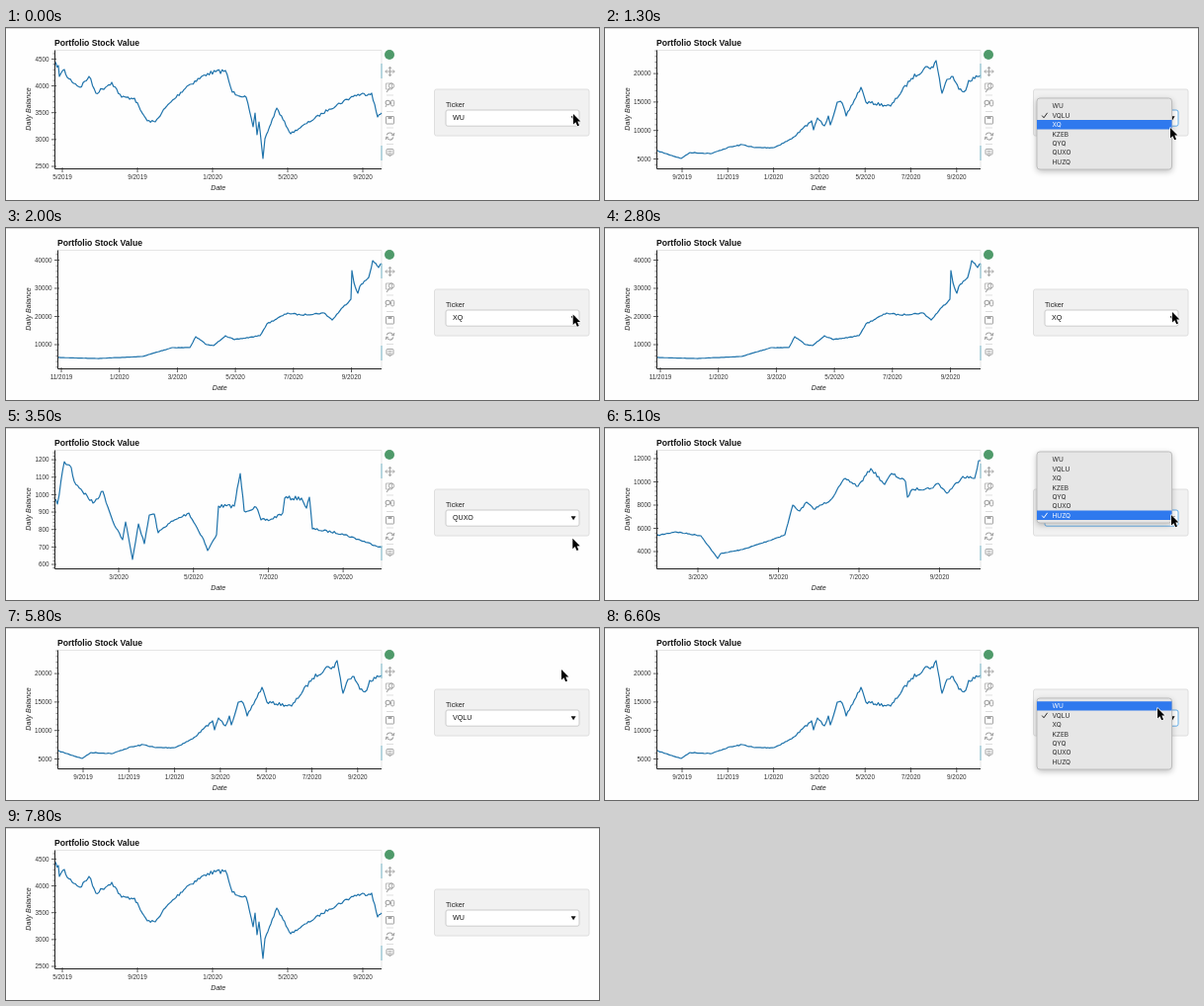
An HTML page with a canvas for the animation above (7900 ms loop, 600 by 174 pixels).

```html
<!DOCTYPE html>
<html lang="en">
<head>
<meta charset="utf-8">
<title>Portfolio Stock Value</title>
<style>
html, body { margin: 0; width: 600px; height: 174px; overflow: hidden; background: #fefefe; }
canvas { display: block; width: 600px; height: 174px; }
</style>
</head>
<body>
<canvas id="stage"></canvas>
<script>
const canvas = document.getElementById('stage');
const ctx = canvas.getContext('2d');
const dpr = window.devicePixelRatio || 1;
canvas.width = 600 * dpr;
canvas.height = 174 * dpr;

const LOOP = 7900, TOP = 22.5, BOTTOM = 142.5, RIGHT = 380;
const SANS = '"Liberation Sans", Arial, sans-serif';
const UI = 'Inter, "Liberation Sans", sans-serif';
const TICKERS = ['WU', 'VQLU', 'XQ', 'KZEB', 'QYQ', 'QUXO', 'HUZQ'];

// Fills the gaps between key points with a small daily wobble, larger for higher values.
function daily(keys, amp) {
  let seed = 7;
  const rand = () => (seed = seed * 16807 % 2147483647) / 2147483647 - 0.5;
  const out = [];
  for (let i = 0; i < keys.length; i += 2) {
    const [x, y, nx, ny] = keys.slice(i, i + 4);
    out.push(x, y);
    if (nx === undefined) break;
    const n = Math.round((nx - x) / 1.6);
    for (let k = 1; k < n; k++) {
      const base = y + (ny - y) * k / n;
      out.push(x + (nx - x) * k / n, base + rand() * amp * (142 - base) / 70);
    }
  }
  return out;
}

// yAxis: [first value, pixel, value step, pixel step, count]
// xAxis: [first month, year, month step, pixel, pixel step, count]
function chart(left, yAxis, xAxis, amp, keys) {
  return { left, yAxis, xAxis, points: daily(keys, amp) };
}

const charts = [];
charts[0] = chart(49, [2500, 140, 500, 27.15, 5], [5, 2019, 4, 57, 76, 5], 3.2, [
  49, 37, 53, 38, 54, 49, 59, 42, 62, 50, 75, 60, 84, 49, 91, 66, 107, 55, 117, 70,
  130, 71, 136, 83, 143, 94, 151, 95, 161, 81, 183, 59, 204, 46, 222, 43, 229, 65, 243, 70,
  250, 100, 252, 86, 254, 108, 256, 95, 260, 132, 262, 112, 274, 81, 288, 107, 327, 82,
  353, 68, 370, 66, 376, 90, 380, 86]);
charts[1] = chart(52, [5000, 132.5, 5000, 28.8, 4], [9, 2019, 2, 78, 46.3, 7], 3.2, [
  52, 124, 77, 132, 86, 126, 108, 127, 124, 121, 139, 118, 151, 121, 171, 121, 189, 112,
  209, 94, 211, 103, 215, 91, 222, 99, 226, 89, 228, 98, 235, 75, 240, 76, 244, 89,
  259, 60, 264, 75, 289, 79, 310, 51, 326, 39, 332, 40, 335, 33, 337, 44, 341, 66,
  346, 52, 352, 49, 358, 62, 365, 63, 368, 53, 380, 48]);
charts[2] = chart(52, [10000, 118, 10000, 28.5, 4], [11, 2019, 2, 56, 58.7, 6], 1.8, [
  52, 131, 92, 132, 138, 130, 168, 121, 186, 121, 192, 110, 203, 118, 210, 119, 222, 109,
  231, 113, 257, 109, 264, 97, 285, 86, 298, 88, 322, 86, 330, 93, 341, 80, 349, 72,
  350, 43, 352, 55, 356, 66, 358, 59, 367, 50, 371, 33, 377, 40, 380, 36]);
charts[5] = chart(49, [600, 138, 100, 17.65, 7], [3, 2020, 2, 114, 75.7, 4], 4, [
  49, 72, 52, 77, 59, 34, 66, 40, 69, 54, 76, 62, 88, 76, 98, 64, 108, 94, 118, 113,
  121, 95, 128, 133, 134, 97, 140, 117, 145, 88, 150, 87, 154, 106, 164, 97, 185, 86,
  200, 113, 204, 124, 213, 108, 215, 79, 231, 79, 237, 46, 241, 84, 253, 80, 258, 93,
  267, 93, 280, 86, 282, 71, 299, 71, 304, 81, 307, 70, 310, 102, 340, 107, 380, 121]);
charts[6] = chart(52, [4000, 125, 2000, 23.5, 5], [3, 2020, 2, 94, 81.5, 4], 2.2, [
  52, 109, 71, 105, 97, 109, 114, 132, 117, 127, 139, 123, 166, 114, 182, 108, 190, 78,
  197, 84, 204, 75, 211, 82, 228, 73, 243, 51, 256, 59, 269, 41, 283, 57, 290, 46,
  304, 54, 306, 70, 311, 62, 330, 61, 337, 56, 346, 66, 362, 49, 374, 51, 378, 33, 380, 33]);

// [start, selected ticker]
const picks = [[0, 0], [700, 1], [1700, 2], [3400, 5], [4900, 6], [5800, 1], [6800, 0]];
// [open, close]
const menus = [[200, 700], [1000, 1700], [2900, 3400], [4400, 4900], [5000, 5800], [6200, 6800]];
// [time, x, y]
const path = [[0, 574, 87], [300, 574, 88], [500, 574, 98], [700, 574, 98], [900, 574, 90],
  [1000, 574, 90], [1200, 572, 101], [1700, 572, 101], [2100, 574, 85], [2900, 574, 85],
  [3300, 573, 116], [3400, 573, 116], [3800, 575, 89], [4400, 575, 89], [4600, 575, 98],
  [4900, 573, 97], [5000, 573, 88], [5200, 573, 88], [5600, 562, 42], [5800, 562, 42],
  [6100, 572, 88], [6300, 572, 88], [6500, 559, 81], [7000, 559, 81]];
const CURSOR_END = 7000;

function text(str, x, y, font, color = '#222', align = 'left') {
  ctx.font = font;
  ctx.fillStyle = color;
  ctx.textAlign = align;
  ctx.fillText(str, x, y);
}

function stroke(color, width, ...pts) {
  ctx.beginPath();
  for (let i = 0; i < pts.length; i += 2) ctx.lineTo(pts[i], pts[i + 1]);
  ctx.strokeStyle = color;
  ctx.lineWidth = width;
  ctx.stroke();
}

function box(x, y, w, h, r, fill, line) {
  ctx.beginPath();
  ctx.roundRect(x, y, w, h, r);
  if (fill) { ctx.fillStyle = fill; ctx.fill(); }
  if (line) { ctx.strokeStyle = line; ctx.lineWidth = 1; ctx.stroke(); }
}

function ring(x, y, r, from = 0, to = Math.PI * 2) {
  ctx.beginPath();
  ctx.arc(x, y, r, from, to);
  ctx.stroke();
}

function drawChart(c) {
  const left = c.left + 0.5, mid = (left + RIGHT) / 2;
  stroke('#e5e5e5', 1, left, TOP, RIGHT, TOP, RIGHT, BOTTOM);
  text('Portfolio Stock Value', c.left, 18, 'bold 8.6px ' + SANS, '#111');

  ctx.lineJoin = 'round';
  stroke('#1f73ab', 1.2, ...c.points);
  stroke('#222', 1, left, TOP, left, BOTTOM, RIGHT, BOTTOM);

  const [v0, y0, dv, dy, ny] = c.yAxis;
  for (let k = -5; k < ny * 5 + 5; k++) {
    const y = y0 - k * dy / 5;
    if (y < TOP || y > BOTTOM) continue;
    const major = k % 5 === 0;
    stroke('#333', major ? 0.8 : 0.6, left - (major ? 3.5 : 2), y, left + (major ? 1.5 : 0), y);
    if (major) text(v0 + dv * k / 5, left - 6, y + 2.3, '6.3px ' + SANS, '#333', 'right');
  }

  const [m0, year, dm, x0, dx, nx] = c.xAxis;
  for (let k = 0; k < nx; k++) {
    const m = m0 - 1 + dm * k, x = x0 + dx * k;
    stroke('#333', 0.8, x, BOTTOM - 1.5, x, BOTTOM + 3.5);
    text((m % 12 + 1) + '/' + (year + Math.floor(m / 12)), x, 153.2, '6.4px ' + SANS, '#333', 'center');
  }

  text('Date', mid, 163.5, 'italic 7.1px ' + SANS, '#222', 'center');
  ctx.save();
  ctx.translate(25, 82);
  ctx.rotate(-Math.PI / 2);
  text('Daily Balance', 0, 0, 'italic 7.1px ' + SANS, '#222', 'center');
  ctx.restore();
}

function drawTools() {
  const gray = '#a3a3a3', x = 388.5;
  ctx.fillStyle = '#4f9a6a';
  ctx.beginPath();
  ctx.arc(388, 27, 5, 0, Math.PI * 2);
  ctx.fill();

  stroke('#8fc3d3', 1.2, RIGHT, 36, RIGHT, 51);
  stroke('#8fc3d3', 1.2, RIGHT, 119, RIGHT, 134);
  for (let y = 68; y < 120; y += 16.5) stroke('#d0d0d0', 0.7, 385, y, 392, y);

  // pan
  for (let i = 0; i < 4; i++) {
    ctx.save();
    ctx.translate(x, 44);
    ctx.rotate(i * Math.PI / 2);
    stroke(gray, 1, 0, 0, 4.5, 0);
    stroke(gray, 0.9, 3, -1.6, 4.8, 0, 3, 1.6);
    ctx.restore();
  }
  // box zoom
  box(384.5, 56, 6, 6, 0, null, '#bbb');
  ctx.strokeStyle = gray;
  ring(390, 58.5, 2.6);
  stroke(gray, 1.1, 388, 61, 385, 65);
  // wheel zoom
  ring(386.3, 75.5, 2.2);
  stroke(gray, 1, 385, 78, 384, 80);
  box(389.5, 73, 3.2, 6, 1.6, null, gray);
  // save
  box(384.5, 89.5, 8, 7.5, 0.5, null, gray);
  box(386.5, 89.5, 4, 2.5, 0, gray);
  // reset
  ctx.lineWidth = 1.1;
  ring(x, 109.5, 3.5, 0.3, 2.8);
  ring(x, 109.5, 3.5, 3.5, 5.9);
  stroke(gray, 1, 392.8, 106, 392.3, 109, 389.8, 108);
  stroke(gray, 1, 384.3, 113, 384.8, 110, 387.2, 111);
  // hover
  box(385, 122.5, 7, 5.5, 0.8, null, gray);
  stroke(gray, 0.8, 386.5, 124.5, 390.5, 124.5);
  stroke(gray, 0.8, 386.5, 126.2, 390.5, 126.2);
  stroke(gray, 1, 387, 128, x, 130, 390, 128);
}

function drawPanel(pick, open) {
  box(433.5, 62, 156.5, 47, 2, '#f1f1f1', '#dedede');
  text('Ticker', 445, 80, '7.1px ' + SANS);
  box(445, 83, 135, 16.2, 2, '#fff', open ? '#66afe9' : '#cbcbcb');
  text(TICKERS[pick], 452, 93.3, '7.1px ' + SANS, '#111');
  ctx.fillStyle = '#111';
  ctx.beginPath();
  ctx.moveTo(571.6, 89.2);
  ctx.lineTo(576.6, 89.2);
  ctx.lineTo(574.1, 93.2);
  ctx.fill();
}

function drawMenu(pick, pos) {
  const row = 9.4, top = 80.4 - row * pick;
  ctx.save();
  ctx.shadowColor = 'rgba(0,0,0,.28)';
  ctx.shadowBlur = 6 * dpr;
  ctx.shadowOffsetY = 2 * dpr;
  box(437, top, 136.5, 72, 3, '#e6e6e6');
  ctx.restore();
  box(437, top, 136.5, 72, 3, null, '#bdbdbd');
  TICKERS.forEach((name, i) => {
    const y = top + 3.2 + row * i;
    const hot = pos.y >= y && pos.y < y + row;
    if (hot) box(437, y, 136.5, row, 0, '#2f79ee');
    const color = hot ? '#fff' : '#2a2a2a';
    text(name, 452.5, y + 7.1, '6.5px ' + UI, color);
    if (i === pick) stroke(color, 1, 442.2, y + 5, 444, y + 7.2, 447.6, y + 2.2);
  });
}

function drawCursor({ x, y }) {
  const shape = [0, 0, 0, 10.5, 2.4, 8.3, 4.2, 12.2, 6, 11.4, 4.3, 7.6, 7.4, 7.4];
  ctx.beginPath();
  for (let i = 0; i < shape.length; i += 2) ctx.lineTo(x + shape[i], y + shape[i + 1]);
  ctx.closePath();
  ctx.strokeStyle = '#fff';
  ctx.lineWidth = 1.4;
  ctx.stroke();
  ctx.fillStyle = '#000';
  ctx.fill();
}

function cursorAt(t) {
  const i = Math.max(1, path.findIndex(p => p[0] > t));
  const [t0, x0, y0] = path[i - 1], [t1, x1, y1] = path[i];
  const u = (t - t0) / (t1 - t0), e = u * u * (3 - 2 * u);
  return { x: x0 + (x1 - x0) * e, y: y0 + (y1 - y0) * e };
}

function draw(now) {
  const t = Math.floor(now % LOOP / 100) * 100;
  const pick = picks.filter(p => p[0] <= t).pop()[1];
  const open = menus.some(([a, b]) => t >= a && t < b);
  const pos = t < CURSOR_END ? cursorAt(t) : null;

  ctx.setTransform(dpr, 0, 0, dpr, 0, 0);
  ctx.fillStyle = '#fefefe';
  ctx.fillRect(0, 0, 600, 174);
  ctx.fillStyle = '#d4d4d4';
  ctx.fillRect(0, 0, 600, 1);

  drawChart(charts[pick]);
  drawTools();
  drawPanel(pick, open);
  if (open) drawMenu(pick, pos);
  if (pos) drawCursor(pos);
}

const start = performance.now();
function tick() {
  draw(performance.now() - start);
  requestAnimationFrame(tick);
}
tick();
</script>
</body>
</html>
```
